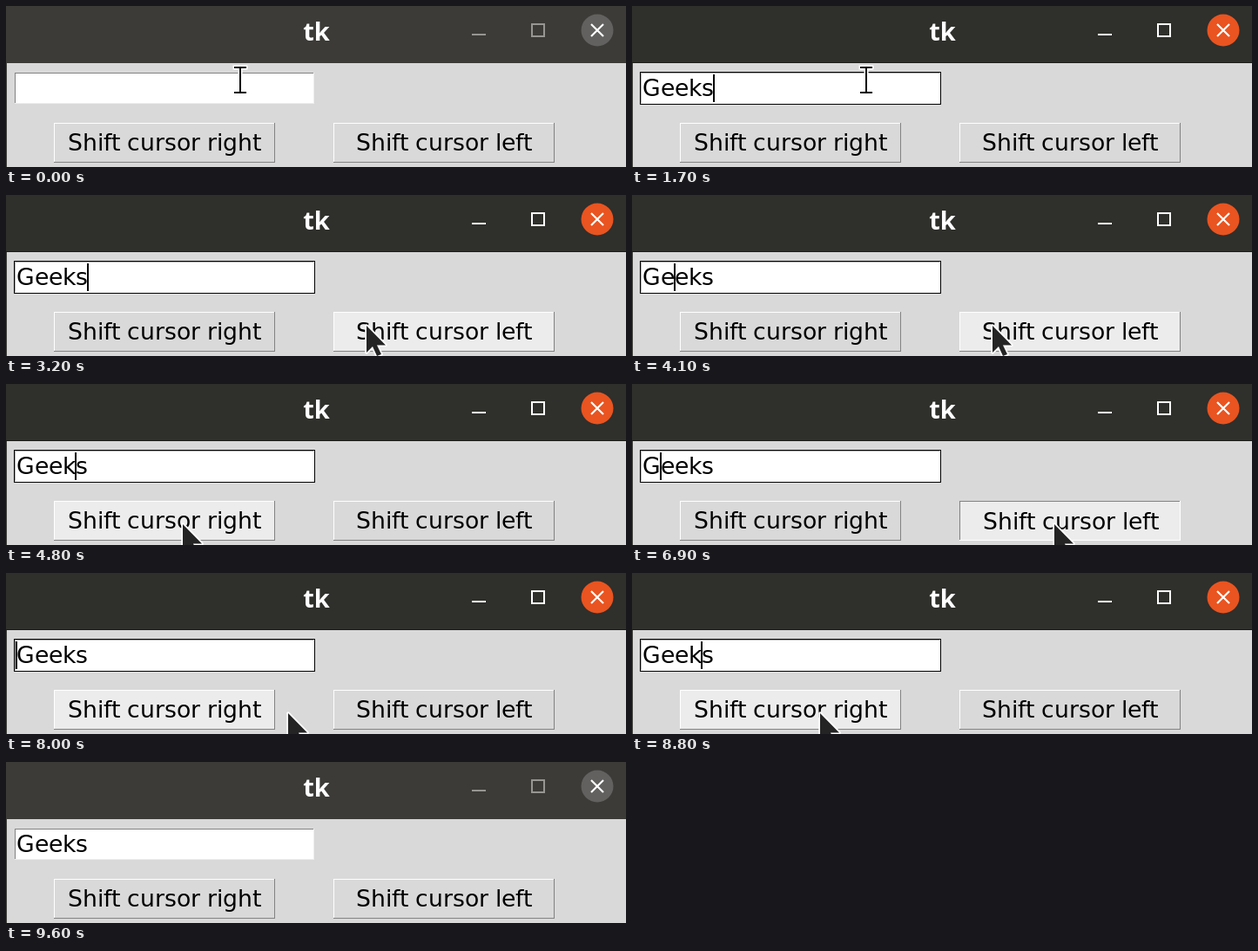
An HTML page with a canvas for the animation above (9700 ms loop, 712x186 px).

```html
<!DOCTYPE html>
<html lang="en">
<head>
<meta charset="utf-8">
<title>tk</title>
<style>
  html, body { margin: 0; width: 712px; height: 186px; overflow: hidden; background: #d9d9d9; }
  canvas { display: block; }
</style>
</head>
<body>
<canvas id="stage" width="712" height="186"></canvas>
<script>
const ctx = document.getElementById('stage').getContext('2d');
const LOOP = 9700;
const UI_FONT = '26.67px "DejaVu Sans", sans-serif';
const TITLE_FONT = 'bold 29px "Noto Sans", "Open Sans", sans-serif';
const WORD = 'Geeks';
const FACE = '#d9d9d9', ACTIVE = '#ececec', LIGHT = '#ffffff', SHADE = '#828282';

// Tracks hold [tenths of a second, value...]; each value lasts until the next entry.
const focusTrack = [[0, false], [3, true], [96, false]];
const typedTrack = [[0, 0], [11, 1], [14, 2], [16, 3], [17, 5]];

// Caret index, -1 while blinked off.
const caretTrack = [
  [0, -1], [3, 0], [8, -1], [11, 1], [14, 2], [16, 3], [17, 5],
  [20, -1], [21, 5], [27, -1], [30, 5], [35, 4], [39, 3], [41, 2],
  [45, 3], [48, 4], [52, 5], [56, -1], [58, 5], [63, -1], [65, 5],
  [66, 4], [67, 3], [68, 2], [69, 1], [72, -1], [74, 0], [81, -1],
  [83, 1], [85, 2], [87, 3], [88, 4], [93, -1]
];

const rightTrack = [
  [0, 'idle'], [43, 'hover'], [44, 'down'], [45, 'hover'], [47, 'down'],
  [48, 'hover'], [51, 'down'], [52, 'hover'], [54, 'down'], [55, 'hover'],
  [58, 'idle'], [80, 'hover'], [83, 'down'], [85, 'hover'], [86, 'down'],
  [87, 'hover'], [89, 'idle']
];
const leftTrack = [
  [0, 'idle'], [31, 'hover'], [34, 'down'], [35, 'hover'], [38, 'down'],
  [39, 'hover'], [40, 'down'], [41, 'hover'], [42, 'idle'], [61, 'hover'],
  [65, 'down'], [66, 'hover'], [67, 'down'], [68, 'hover'], [69, 'down'],
  [72, 'hover'], [74, 'down'], [75, 'hover'], [79, 'idle']
];

const pointerTrack = [
  [0, 'beam', 269, 85], [27, 'beam', 283, 91], [28, 'beam', 312, 100],
  [29, 'arrow', 350, 119], [30, 'arrow', 386, 137], [31, 'arrow', 407, 148],
  [32, 'arrow', 413, 150], [42, 'arrow', 340, 156], [43, 'arrow', 240, 161],
  [44, 'arrow', 202, 161], [52, 'arrow', 208, 161], [55, 'arrow', 232, 161],
  [56, 'arrow', 254, 161], [60, 'arrow', 300, 160], [61, 'arrow', 375, 160],
  [62, 'arrow', 445, 161], [63, 'arrow', 484, 161], [76, 'arrow', 478, 161],
  [77, 'arrow', 460, 161], [78, 'arrow', 430, 161], [79, 'arrow', 385, 161],
  [80, 'arrow', 323, 161], [81, 'arrow', 215, 161], [89, 'arrow', 225, 122],
  [90, 'arrow', 240, 31], [91, 'none', 0, 0]
];

function at(track, tick) {
  let hit = track[0];
  for (const step of track) if (step[0] <= tick) hit = step;
  return hit;
}

function box(x, y, w, h, color) {
  ctx.fillStyle = color;
  ctx.fillRect(x, y, w, h);
}

function bevel(x, y, w, h, fill, topLeft, bottomRight) {
  box(x, y, w, h, bottomRight);
  box(x, y, w - 1, h - 1, topLeft);
  box(x + 1, y + 1, w - 2, h - 2, fill);
}

const advance = ch => Math.round(ctx.measureText(ch).width);
const widthOf = text => [...text].reduce((sum, ch) => sum + advance(ch), 0);

// Letters sit on whole pixels, as in hinted toolkit text.
function label(text, x, y) {
  ctx.fillStyle = '#000';
  for (const ch of text) {
    ctx.fillText(ch, x, y);
    x += advance(ch);
  }
}

function line(color, width, ...pts) {
  ctx.strokeStyle = color;
  ctx.lineWidth = width;
  ctx.beginPath();
  for (let i = 0; i < pts.length; i += 4) {
    ctx.moveTo(pts[i], pts[i + 1]);
    ctx.lineTo(pts[i + 2], pts[i + 3]);
  }
  ctx.stroke();
}

function titleBar(focused) {
  box(0, 0, 712, 66, focused ? '#2f2f2b' : '#3c3b38');
  if (focused) box(0, 65, 712, 1, '#1d1d1a');
  ctx.font = TITLE_FONT;
  ctx.textAlign = 'center';
  ctx.fillStyle = '#fff';
  ctx.fillText('tk', 356.5, 40);
  ctx.textAlign = 'left';

  const glyph = focused ? '#fff' : '#979693';
  box(535, 32, 16, 2, glyph);
  ctx.strokeStyle = glyph;
  ctx.lineWidth = 2;
  ctx.strokeRect(604, 21, 14, 14);

  ctx.fillStyle = focused ? '#e95420' : '#62615f';
  ctx.beginPath();
  ctx.arc(679, 28, 18.5, 0, Math.PI * 2);
  ctx.fill();
  line('#fff', 2.2, 672, 21, 686, 35, 686, 21, 672, 35);
}

function entry(focused, count, caret) {
  if (focused) box(9, 76, 346, 38, '#000');
  bevel(10, 77, 344, 36, '#fff', focused ? '#b0b0b0' : SHADE, focused ? '#fff' : '#ededed');
  ctx.font = UI_FONT;
  if (caret >= 0) box(11 + widthOf(WORD.slice(0, caret)), 79, 2, 32, '#000');
  label(WORD.slice(0, count), 12, 104);
}

function button(text, x, state) {
  const down = state === 'down';
  const fill = state === 'idle' ? FACE : ACTIVE;
  bevel(x, 135, 254, 46, fill, down ? SHADE : LIGHT, down ? LIGHT : SHADE);
  ctx.font = UI_FONT;
  const shift = down ? 1 : 0;
  label(text, x + 127 - Math.round(widthOf(text) / 2) + shift, 167 + shift);
}

function beam(x, y) {
  const bars = [x, y - 13, x, y + 13, x - 6, y - 14, x - 1, y - 14, x + 1, y - 14, x + 6, y - 14,
    x - 6, y + 15, x - 1, y + 15, x + 1, y + 15, x + 6, y + 15];
  ctx.lineCap = 'square';
  line('#fff', 5, ...bars);
  line('#000', 2, ...bars);
  ctx.lineCap = 'butt';
}

function arrow(x, y) {
  ctx.save();
  ctx.translate(x, y);
  ctx.beginPath();
  [[1, 1], [1, 32], [8, 25], [13, 36], [18, 34], [13, 23.5], [23, 23.5]]
    .forEach(p => ctx.lineTo(...p));
  ctx.closePath();
  ctx.lineJoin = 'round';
  ctx.strokeStyle = '#fff';
  ctx.lineWidth = 3.5;
  ctx.stroke();
  ctx.fillStyle = '#242424';
  ctx.fill();
  ctx.restore();
}

function draw(ms) {
  const tick = Math.floor((ms % LOOP) / 100 + 1e-6);
  const focused = at(focusTrack, tick)[1];
  box(0, 0, 712, 186, FACE);
  titleBar(focused);
  box(0, 66, 1, 120, '#3a3a37');
  entry(focused, at(typedTrack, tick)[1], at(caretTrack, tick)[1]);
  button('Shift cursor right', 55, at(rightTrack, tick)[1]);
  button('Shift cursor left', 376, at(leftTrack, tick)[1]);
  const [, kind, x, y] = at(pointerTrack, tick);
  if (kind === 'beam') beam(x, y);
  if (kind === 'arrow') arrow(x, y);
}

const start = performance.now();
function loop() {
  draw(performance.now() - start);
  requestAnimationFrame(loop);
}
loop();
</script>
</body>
</html>
```
